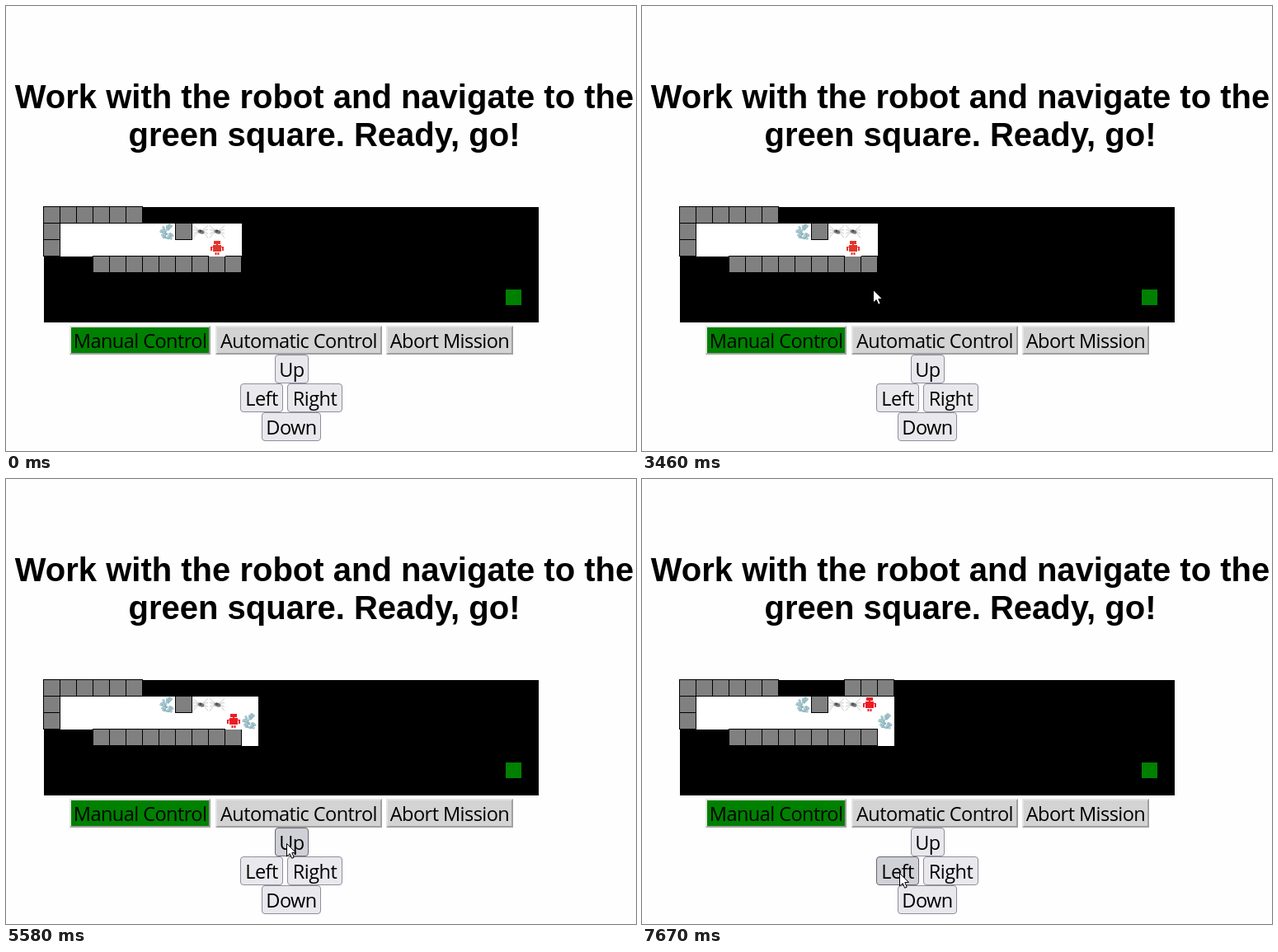
Write an HTML page with a canvas that moves like this. It is 764 px wide and 540 px high and loops after 8000 ms.

```html
<!DOCTYPE html>
<html lang="en">
<head>
<meta charset="utf-8">
<title>Robot navigation</title>
<style>
  html, body { margin: 0; width: 100%; height: 100%; overflow: hidden; background: #fefefe; }
  canvas { display: block; }
</style>
</head>
<body>
<canvas id="stage" width="764" height="540"></canvas>
<script>
const ctx = document.getElementById('stage').getContext('2d');
const LOOP = 8000, STEP = 77, PRESS = 120;
const CELL = 20, LEFT = 46, TOP = 244;
const CENTER = 346, BUTTON_H = 35, GAP = 5.5;
const MOVE_RIGHT = 5270, MOVE_UP = 6280;
const clicks = [4870, 5810, 7530];

// Cursor path: start time, number of steps, destination
const path = [
  [620, 4, 178, 353],
  [990, 2, 267, 284],
  [1300, 3, 241, 267],
  [1530, 4, 258, 270],
  [2230, 3, 234, 268],
  [2540, 2, 267, 268],
  [2770, 2, 245, 272],
  [3310, 5, 333, 451],
  [3780, 2, 351, 434],
  [4400, 5, 370, 468],
  [5420, 3, 340, 442],
  [6520, 4, 312, 478],
];
const highlighted = t => t >= 2230 && t < 3310;

const modeRow = [['Manual Control', 171], ['Automatic Control', 202], ['Abort Mission', 154]];
const arrowRows = [[['Up', 41]], [['Left', 52], ['Right', 67]], [['Down', 72]]];

function rect(color, x, y, w, h) {
  ctx.fillStyle = color;
  ctx.fillRect(x, y, w, h);
}

function circle(color, x, y, r) {
  ctx.fillStyle = color;
  ctx.beginPath();
  ctx.arc(x, y, r, 0, 7);
  ctx.fill();
}

function text(string, x, y, font, spacing = '0px') {
  ctx.font = font;
  ctx.letterSpacing = spacing;
  ctx.textAlign = 'center';
  ctx.fillStyle = '#000';
  ctx.fillText(string, x, y);
}

function cursorAt(t) {
  let x = 302, y = 342;
  for (const [start, steps, toX, toY] of path) {
    if (t < start) break;
    const done = Math.min(steps, Math.floor((t - start) / STEP) + 1) / steps;
    x += (toX - x) * done;
    y += (toY - y) * done;
  }
  return { x: Math.round(x), y: Math.round(y), visible: t >= path[0][0] };
}

function inCell(col, row, draw) {
  ctx.save();
  ctx.translate(LEFT + col * CELL, TOP + row * CELL);
  draw();
  ctx.restore();
}

function tile(col, row, color = '#808080') {
  inCell(col, row, () => {
    rect(color, 0, 0, CELL, CELL);
    ctx.lineWidth = 1;
    ctx.strokeStyle = '#000';
    ctx.strokeRect(-0.5, -0.5, CELL, CELL);
  });
}

function walls(from, to, row) {
  for (let col = from; col <= to; col++) tile(col, row);
}

function floor(col, row, cols, rows) {
  inCell(col, row, () => rect('#fff', 0, 0, cols * CELL, rows * CELL));
}

// Pebbles heaped in an arc that opens to the right
function rubble(col, row) {
  let seed = 11;
  const random = () => (seed = seed * 16807 % 2147483647) / 2147483647;
  inCell(col, row, () => {
    for (let i = 0; i < 48; i++) {
      const angle = 0.7 + random() * 4.5, distance = 3 + random() * 6;
      const x = 10.5 + Math.cos(angle) * distance, y = 10 + Math.sin(angle) * distance;
      circle('#84a8b1', x, y, 1.5);
      circle('#b0d3da', x - 0.2, y - 0.2, 1.15);
    }
  });
}

function spider(col, row) {
  inCell(col, row, () => {
    ctx.lineWidth = 0.6;
    ctx.strokeStyle = '#aaa';
    ctx.beginPath();
    for (const side of [-1, 1]) {
      for (let leg = -1.5; leg <= 1.5; leg++) {
        ctx.moveTo(10, 10);
        ctx.lineTo(10 + side * 5, 9 + leg * 2);
        ctx.lineTo(10 + side * 9, 10 + leg * 5);
      }
    }
    ctx.stroke();
    ctx.fillStyle = '#777';
    ctx.beginPath();
    ctx.ellipse(10.5, 10, 4, 2.4, 0.3, 0, 7);
    ctx.fill();
    circle('#444', 10, 9, 1.3);
  });
}

function robot(col, row, color) {
  floor(col, row, 1, 1);
  inCell(col, row, () => {
    rect(color, 6, 1, 8, 4);
    rect(color, 9, 5, 2, 1);
    rect(color, 5, 6, 10, 8);
    for (const side of [-1, 1]) {
      rect(color, 10 + side * 6.5 - 1.5, 8, 3, 1);
      rect(color, 10 + side * 7 - 1, 9, 2, 4);
      rect(color, 10 + side * 1.5 - 1, 15, 2, 3);
    }
  });
}

function drawMap(t) {
  const right = t >= MOVE_RIGHT, up = t >= MOVE_UP;
  rect('#000', LEFT, TOP, 30 * CELL, 7 * CELL);
  floor(1, 1, 11, 2);
  if (right) floor(12, 1, 1, 3);
  rubble(7, 1);
  if (right) rubble(12, 2);
  spider(9, 1);
  spider(10, 1);
  walls(0, 5, 0);
  if (up) walls(10, 12, 0);
  walls(0, 0, 1);
  walls(0, 0, 2);
  walls(3, 11, 3);
  tile(8, 1);
  tile(28, 5, '#008000');
  robot(right ? 11 : 10, up ? 1 : 2, right ? '#ed1c24' : '#e2352b');
}

function drawRow(buttons, y, drawButton) {
  const total = buttons.reduce((sum, [, w]) => sum + w + GAP, -GAP);
  let left = CENTER - total / 2;
  for (const [name, w] of buttons) {
    const x = Math.round(left);
    drawButton(x, y, w, name);
    text(name, x + w / 2, y + 27, '23.5px "Open Sans", "Noto Sans", sans-serif', '-0.55px');
    left += w + GAP;
  }
}

function modeButton(x, y, w, name) {
  const r = x + w, b = y + BUTTON_H;
  rect('#a0a0a0', x, y, w, BUTTON_H);
  ctx.fillStyle = '#e3e3e3';
  ctx.fill(new Path2D(`M${x} ${b}V${y}H${r}l-2 2L${x + 2} ${b - 2}Z`));
  rect(name === 'Manual Control' ? '#008000' : '#d3d3d3', x + 2, y + 2, w - 4, BUTTON_H - 4);
}

function arrowButton(x, y, w, cursor, pressed) {
  const hover = cursor.visible && cursor.x >= x && cursor.x < x + w &&
    cursor.y >= y && cursor.y < y + BUTTON_H;
  const [fill, border] = !hover ? ['#e9e9ed', '#8f8f9d']
    : pressed ? ['#b1b1b9', '#484851'] : ['#d0d0d7', '#676774'];
  ctx.beginPath();
  ctx.roundRect(x + 0.5, y + 0.5, w - 1, BUTTON_H - 1, 3.5);
  ctx.fillStyle = fill;
  ctx.fill();
  ctx.lineWidth = 1;
  ctx.strokeStyle = border;
  ctx.stroke();
}

const pointer = new Path2D('M0 .5V16L3.7 12.6 6.2 18.3 8.7 17.2 6.3 11.6 11 11.4Z');

function drawCursor({ x, y }, glow) {
  if (glow) circle('rgba(255, 255, 0, 0.6)', x, y, 12);
  ctx.save();
  ctx.translate(x + 0.5, y);
  ctx.fillStyle = '#fff';
  ctx.fill(pointer);
  ctx.lineWidth = 1;
  ctx.strokeStyle = '#000';
  ctx.stroke(pointer);
  ctx.restore();
}

function draw(now) {
  const t = now % LOOP;
  const cursor = cursorAt(t);
  const pressed = clicks.some(click => t >= click && t < click + PRESS);
  rect('#fefefe', 0, 0, 764, 540);
  const heading = 'bold 40px "Liberation Sans", Arial, sans-serif';
  text('Work with the robot and navigate to the', 386, 124, heading);
  text('green square. Ready, go!', 386, 170, heading);
  drawMap(t);
  drawRow(modeRow, 388, modeButton);
  arrowRows.forEach((row, i) => drawRow(row, 423 + i * BUTTON_H,
    (x, y, w) => arrowButton(x, y, w, cursor, pressed)));
  if (cursor.visible) drawCursor(cursor, highlighted(t));
}

const began = performance.now();
function frame() {
  draw(performance.now() - began);
  requestAnimationFrame(frame);
}
frame();
</script>
</body>
</html>
```
